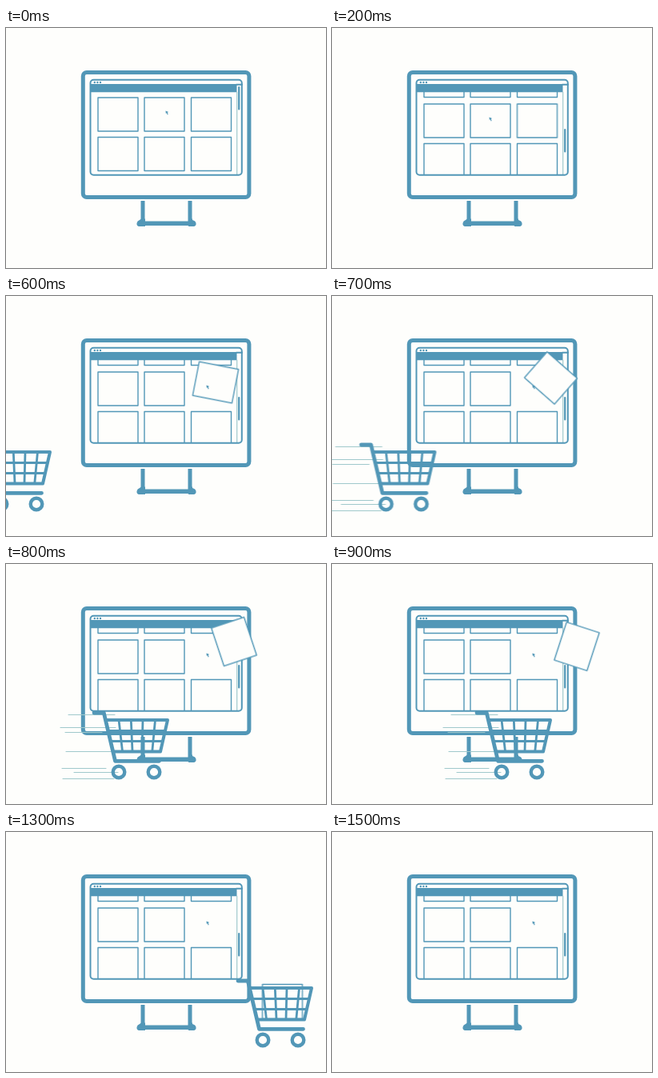
Recreate the animation shown at these times as an HTML page. Size 400 px wide and 300 px high, loop 1.6 s.

```html
<!DOCTYPE html>
<html lang="en">
<head>
<meta charset="utf-8">
<title>Online shopping</title>
<style>
  html, body { margin: 0; width: 100%; height: 100%; overflow: hidden; background: #fefefc; }
  svg {
    --ink: #5297b7; --pale: #a0c9cc; --paper: #fefefc;
    display: block; width: 100vw; height: 100vh;
    fill: none; stroke: var(--ink); stroke-linejoin: round; stroke-linecap: round;
  }
  .solid { fill: var(--ink); stroke: none; }
  .tile { stroke-width: 1.4; }
  .paper { fill: var(--paper); }
  .pale { stroke: var(--pale); }

  /* one step is 100 ms = 6.25 % */
  .page, .thumb, .cursor, .picked, .card, .cart, .tilt, .speed {
    animation: 1.6s step-end infinite;
  }
  .page { animation-name: page; }
  .thumb { animation-name: thumb; }
  .cursor { animation-name: cursor; }
  .picked { animation-name: picked; }
  .card { animation-name: card; }
  .cart { animation-name: cart; }
  .tilt { animation-name: tilt; transform-origin: 365px 260px; }
  .speed { animation-name: speed; }

  @keyframes page {
    0% { transform: translateY(0); animation-timing-function: steps(2); }
    12.5%, 100% { transform: translateY(-92px); }
  }
  @keyframes thumb {
    0% { transform: translateY(0); animation-timing-function: steps(2); }
    12.5%, 100% { transform: translateY(53px); }
  }
  @keyframes cursor {
    0% { transform: translate(-51px, -8px); animation-timing-function: steps(2); }
    12.5% { transform: translate(-54px, 0); animation-timing-function: steps(2); }
    25%, 100% { transform: translate(0, 0); }
  }
  @keyframes picked {
    0% { opacity: 1; }
    31.25%, 100% { opacity: 0; }
  }
  @keyframes card {
    0% { opacity: 0; transform: translate(256.5px, 116px) rotate(0deg); }
    31.25% { opacity: 1; transform: translate(257px, 114px) rotate(3deg); }
    37.5% { opacity: 1; transform: translate(262px, 108px) rotate(11deg); animation-timing-function: steps(2); }
    50% { opacity: 1; transform: translate(285px, 97px) rotate(71.6deg); }
    56.25% { opacity: 1; transform: translate(306px, 103px) rotate(108deg); }
    62.5% { opacity: 1; transform: translate(328px, 135px) rotate(145deg); }
    68.75% { opacity: 1; transform: translate(344.5px, 193px) rotate(180deg); }
    75% { opacity: 1; transform: translate(345px, 207px) rotate(180deg); }
    81.25% { opacity: 1; transform: translate(345.5px, 212px) rotate(180deg); }
    87.5% { opacity: 1; transform: translate(395.5px, 212px) rotate(180deg); }
    93.75%, 100% { opacity: 0; transform: translate(500px, 212px) rotate(180deg); }
  }
  @keyframes cart {
    0% { transform: translate(-480px, 0); }
    37.5% { transform: translate(-327px, 0); animation-timing-function: steps(2); }
    50% { transform: translate(-180px, 0); animation-timing-function: steps(2); }
    62.5% { transform: translate(-38px, 0); }
    68.75% { transform: translate(-5px, -2px); }
    75% { transform: translate(-1px, 0); }
    81.25% { transform: translate(0, 0); }
    87.5% { transform: translate(50px, 0); }
    93.75%, 100% { transform: translate(160px, 0); }
  }
  @keyframes tilt {
    0% { transform: rotate(0deg); }
    68.75% { transform: rotate(6.8deg); }
    75% { transform: rotate(2.5deg); }
    81.25%, 100% { transform: rotate(0deg); }
  }
  @keyframes speed {
    0% { opacity: 0; }
    43.75% { opacity: 1; }
    62.5% { opacity: .5; }
    68.75%, 100% { opacity: 0; }
  }
</style>
</head>
<body>
<svg viewBox="0 0 400 300">
  <defs>
    <clipPath id="view"><rect x="105" y="80" width="183.5" height="103.5"/></clipPath>
    <rect id="tile" class="tile" width="50" height="42"/>
    <g id="row">
      <use href="#tile" x="115"/>
      <use href="#tile" x="173"/>
      <use href="#tile" x="231.5"/>
    </g>
  </defs>

  <!-- monitor -->
  <rect x="96.3" y="55.5" width="207.6" height="156" rx="4.5" stroke-width="5"/>
  <path d="M171 216V244H230V216" stroke-width="5" stroke-linecap="butt"/>
  <path d="M166.5 244.5H234.5" stroke-width="5"/>
  <path class="solid" d="M169 238.5h5v9.5h-8q-3-1-2.5-4q.5-3 3.5-4zM228 238.5h5v1.5q4 1 4.5 4q.5 3-2.5 4h-7z"/>

  <!-- browser window -->
  <g clip-path="url(#view)">
    <g class="page">
      <use href="#row" y="87"/>
      <use href="#row" y="136.5"/>
      <use href="#tile" x="115" y="187"/>
      <use href="#tile" x="173" y="187"/>
      <use class="picked" href="#tile" x="231.5" y="187"/>
      <use href="#row" y="236.5"/>
    </g>
  </g>
  <path class="solid" d="M105 70H288.5V80.3H105z"/>
  <path d="M288 70.7H295" stroke-width="2"/>
  <path class="pale" d="M288.7 80V183" stroke-width="1.2"/>
  <rect x="105.5" y="64.7" width="189.3" height="119" rx="4" stroke-width="2"/>
  <path d="M110.8 68h.01M114.4 68h.01M118 68h.01" stroke-width="2.4"/>
  <path class="thumb" d="M291.2 74V101.5" stroke-width="2.2"/>

  <g class="card"><rect class="tile paper" x="-25" y="-21.5" width="50" height="43"/></g>
  <path class="cursor solid" d="M250.5 111.5l3.7 1.6l-1.5.6l1 2.4l-1 .4l-.9-2.3l-1 .9z"/>

  <!-- cart -->
  <g class="cart">
    <path class="speed pale" stroke-width="1.1"
      d="M258 188.5h58M248 204.5h69M254 210.5h46M255 234.5h65M250 255.500h55M265 260.5h55M251 268.5h64"/>
    <g class="tilt">
      <path d="M290 186H302.3L316.5 246.3H371.5" stroke-width="4.8"/>
      <path d="M305 195H382L373 234.5H314.500" stroke-width="4"/>
      <path d="M308 208.5H379M311 221.5H376M321 195l4.500 39M336.300 195l1.700 39M351 195l-1 39M366.500 195l-3.700 39" stroke-width="2.800"/>
      <circle cx="321" cy="260" r="7.3" stroke-width="4.4"/>
      <circle cx="365" cy="260" r="7.3" stroke-width="4.4"/>
    </g>
  </g>
</svg>
</body>
</html>
```
